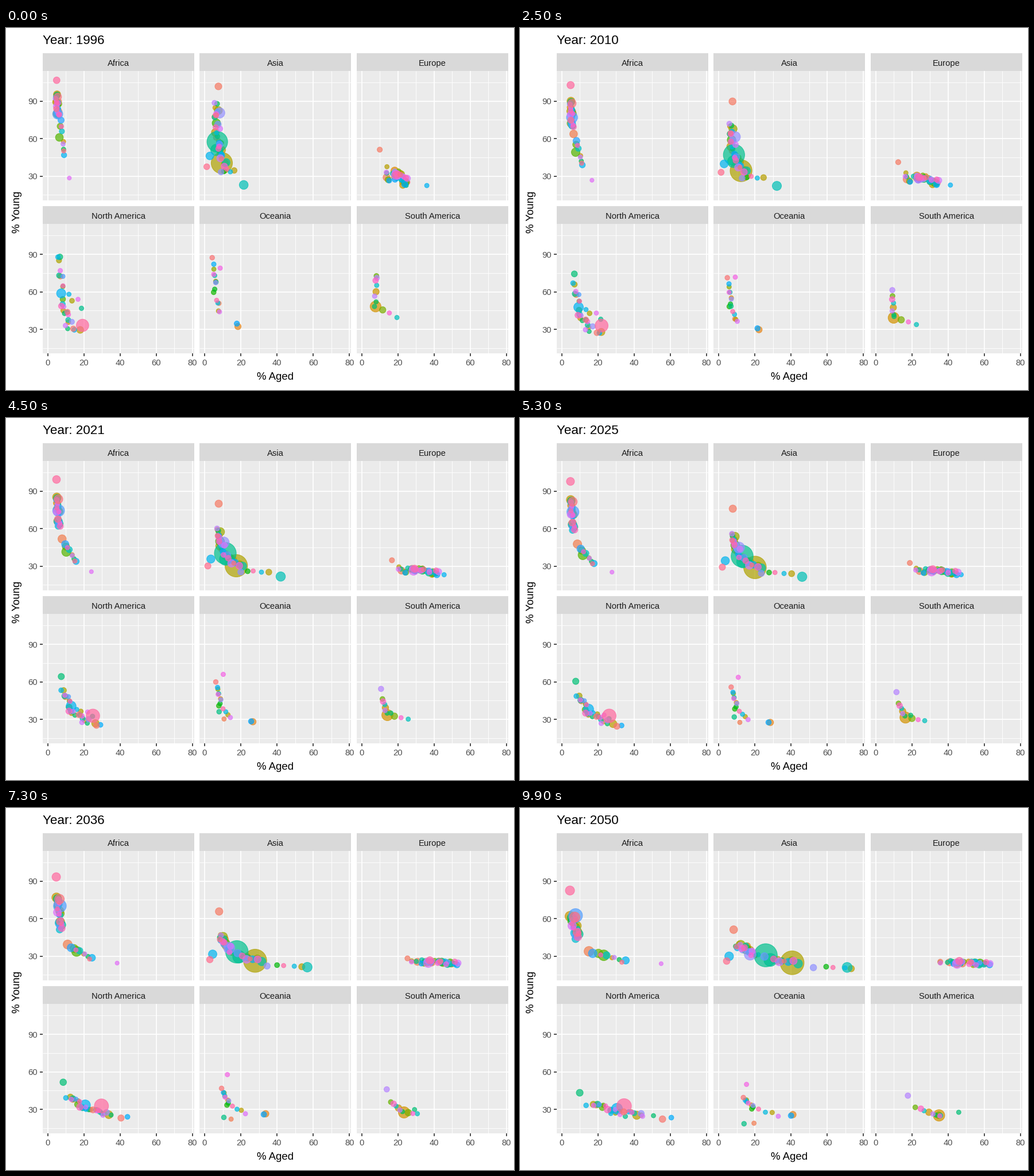
Animation of 885 by 632 pixels, one loop 10 s. Source, as a matplotlib script:

```python
import numpy as np
import matplotlib.pyplot as plt
from matplotlib.animation import FuncAnimation
from matplotlib.patches import Rectangle

W, H, DPI = 885, 632, 100
PT = 72 / DPI                       # points per pixel
FRAMES, INTERVAL = 100, 100
FIRST, LAST = 1996, 2050
PANELS = ["Africa", "Asia", "Europe", "North America", "Oceania", "South America"]
AFRICA, ASIA, EUROPE, NORTH, OCEANIA, SOUTH = range(6)
GROWTH = [1.35, 1.12, 1, 1.18, 1.05, 1.05]     # radius gain over the whole span
R_MIN = 4.3
R_MAX = [7.2, 8, 7.5, 5.6, 5.2, 6.5]

plt.rcParams["font.family"] = "Liberation Sans"
rng = np.random.default_rng(11)


def hcl(hue, chroma=100, light=65):
    """Polar LUV to sRGB; hue runs once round the wheel for 0..1."""
    h = np.radians(15 + 360 * hue)
    u = chroma * np.cos(h) / (13 * light) + 0.1978
    v = chroma * np.sin(h) / (13 * light) + 0.4683
    y = ((light + 16) / 116) ** 3
    x = y * 9 * u / (4 * v)
    z = y * (12 - 3 * u - 20 * v) / (4 * v)
    m = np.array([[3.2405, -1.5371, -0.4985],
                  [-0.9693, 1.8760, 0.0416],
                  [0.0556, -0.2040, 1.0572]])
    rgb = np.clip(m @ [x, y, z], 0, 1)
    return np.where(rgb > 0.0031308, 1.055 * rgb ** (1 / 2.4) - 0.055, 12.92 * rgb)


def to_px(panel, x, y):
    row, col = np.divmod(panel, 3)
    return 72.5 + 273.55 * col + 3.153 * x, 127.7 + 267.5 * row + 2.183 * (90 - y)


bubbles = []                        # panel, hue, radius, start x y, end x y


def add(panel, hue, radius, start, end):
    bubbles.append((panel, hue, radius, *start, *end))


def crowd(panel, n, start_a, start_b, end_a, end_b, spread=1.0):
    """Bubbles strung along one segment that drift to another."""
    seg = np.array([start_a, start_b, end_a, end_b], float)
    shift = rng.random()
    for k in range(n):
        u = (k + 0.5) / n
        start = seg[0] + (seg[1] - seg[0]) * u + rng.uniform(-1, 1, 2) * (1, 3) * spread
        end = seg[2] + (seg[3] - seg[2]) * u + rng.uniform(-1, 1, 2) * (1.5, 1.2) * spread
        radius = R_MIN + (R_MAX[panel] - R_MIN) * rng.random() ** 2
        add(panel, (shift + 0.618 * k) % 1, radius, start, end)


# Bubbles that stand out: hue, radius, where they start and where they end.
add(AFRICA, .94, 6.3, (5, 106.7), (4.6, 82.5))
add(AFRICA, .66, 9.3, (5.6, 79.7), (7.7, 62.5))
add(AFRICA, .285, 7.3, (6.5, 61), (23.3, 30.7))
add(AFRICA, .79, 4, (12, 28.5), (55, 24))
add(ASIA, .18, 19, (9.5, 40.5), (40.6, 24.7))
add(ASIA, .42, 18.5, (7, 57.5), (26, 30.7))
add(ASIA, .43, 10.5, (6.5, 51), (28.6, 27))
add(ASIA, .475, 8.2, (21.6, 23), (71, 21))
add(ASIA, .70, 9.5, (8.3, 80.6), (17.4, 31.5))
add(ASIA, .01, 6.5, (7.6, 101.8), (8.3, 51.2))
add(EUROPE, .01, 5, (10, 51.2), (35.7, 25.6))
add(EUROPE, .78, 8.7, (19, 31), (45, 24))
add(EUROPE, .59, 4.4, (36, 22.5), (57, 23.5))
add(NORTH, .94, 11.3, (19.3, 33.2), (34.5, 32.7))
add(NORTH, .59, 8.5, (7.5, 58.8), (30.6, 30.5))
add(NORTH, .16, 6.5, (18, 29.6), (41.5, 25.3))
add(NORTH, .39, 5.5, (6.8, 88), (10, 43.3))
add(OCEANIA, .64, 5.1, (17.8, 34.6), (40, 25))
add(OCEANIA, .06, 6, (18.4, 32.3), (41, 25.8))
add(OCEANIA, .83, 4.4, (8.6, 79), (15.4, 50))
add(SOUTH, .11, 10, (7.7, 48.3), (35, 25.2))
add(SOUTH, .73, 5.1, (8.4, 71.2), (17.8, 41))
add(SOUTH, .39, 4.4, (7.1, 48.3), (45.9, 27.7))

crowd(AFRICA, 34, (5.2, 95), (5.8, 79), (6, 63), (9, 44))
crowd(AFRICA, 10, (6.5, 82), (9.3, 42), (13, 34), (38, 25))
crowd(ASIA, 22, (6, 88), (8, 52), (10, 40), (21, 31), 1.4)
crowd(ASIA, 13, (7.5, 58), (11, 38), (24, 29), (45, 25), 1.3)
crowd(ASIA, 5, (8, 32), (17, 34), (50, 21.5), (77, 19))
crowd(ASIA, 2, (0.6, 33), (3.6, 51), (4, 24), (6.4, 32), 0.3)
crowd(EUROPE, 32, (17, 34), (25, 25), (42, 25), (64, 23.5), 1.2)
crowd(EUROPE, 6, (14, 38), (15, 25), (33, 26), (48, 24.5))
crowd(NORTH, 8, (5.5, 87), (9, 62), (14, 34), (25, 33))
crowd(NORTH, 13, (7.5, 52), (13, 35), (22, 31), (46, 25.5))
crowd(NORTH, 4, (11, 59), (20, 48), (26, 28), (38, 25))
crowd(NORTH, 4, (9.5, 32), (16, 29), (43, 25.5), (63, 22))
crowd(OCEANIA, 8, (4.6, 88), (6.5, 62), (13, 40), (20, 31))
crowd(OCEANIA, 5, (5.5, 61), (8.4, 42), (18, 31), (33, 25))
crowd(OCEANIA, 2, (5, 75), (9, 44), (11.5, 19), (22, 19), 0.4)
crowd(SOUTH, 6, (8.2, 76), (7.3, 48), (21, 31.5), (34, 25.5), 0.6)
crowd(SOUTH, 3, (9, 46), (22, 38), (34.5, 25), (37, 25), 0.5)

bubbles.sort(key=lambda b: b[1])
panel, hue, radius, x0, y0, x1, y1 = np.array(bubbles, float).T
growth = np.array(GROWTH)[panel.astype(int)]
# Old populations age steadily, young ones late; high birth rates fall late.
age_power = np.maximum(1, 2.2 - 0.05 * x0)
youth_power = np.clip(1.7 - 0.04 * (y1 - 32), 0.6, 1.7)


def positions(t):
    x = x0 + (x1 - x0) * t ** age_power
    y = y1 + (y0 - y1) * (1 - t) ** youth_power
    return np.column_stack(to_px(panel, x, y))


def sizes(t):
    r = radius * (1 + (growth - 1) * t * (radius > 5))
    return (2 * (r - 0.5) * PT) ** 2


fig = plt.figure(figsize=(W / DPI, H / DPI), dpi=DPI, facecolor="white")
ax = fig.add_axes([0, 0, 1, 1])
ax.set(xlim=(0, W), ylim=(H, 0))
ax.axis("off")


def box(x, y, w, h, color):
    ax.add_patch(Rectangle((x, y), w, h, fc=color, lw=0, zorder=0))


def line(xs, ys, width, color="white"):
    ax.plot(xs, ys, color=color, lw=width * PT, solid_capstyle="butt", zorder=1)


def label(x, y, s, px, color="black", **kw):
    return ax.text(x, y, s, fontsize=px * PT, color=color, **kw)


for p, name in enumerate(PANELS):
    row, col = divmod(p, 3)
    left, top = int(64 + 273.5 * col), int(75 + 267.5 * row)
    right, bottom = left + 264, top + 226
    box(left, top - 31, 264, 31, "#D9D9D9")
    box(left, top, 264, 226, "#EBEBEB")
    label(left + 132, top - 9.3, name, 14.8, "#1A1A1A", ha="center")
    for width, gx0, gy0 in ((0.9, 10, 15), (1.7, 0, 30)):
        for gx in range(gx0, 81, 20):
            x = to_px(p, gx, 0)[0]
            line([x, x], [top, bottom], width)
        for gy in range(gy0, 106, 30):
            y = to_px(p, 0, gy)[1]
            line([left, right], [y, y], width)
    if row == 1:
        for gx in range(0, 81, 20):
            x = to_px(p, gx, 0)[0]
            line([x, x], [bottom, bottom + 4.6], 1.7, "#333333")
            label(x, 589, str(gx), 14.8, "#4D4D4D", ha="center")
    if col == 0:
        for gy in (30, 60, 90):
            y = to_px(p, 0, gy)[1]
            line([left - 4.6, left], [y, y], 1.7, "#333333")
            label(left - 9, y + 5.6, str(gy), 14.8, "#4D4D4D", ha="right")

label(469.5, 614, "% Aged", 18.7, ha="center")
label(24, 321.5, "% Young", 18.7, rotation=90, rotation_mode="anchor", ha="center")
title = label(64, 27.5, "", 22.4)

colors = [(*hcl(h), 0.7) for h in hue]
dots = ax.scatter(*positions(0).T, s=sizes(0), c=colors,
                  edgecolors=colors, linewidths=1.1 * PT, zorder=3)


def update(i):
    t = i / (FRAMES - 1)
    dots.set_offsets(positions(t))
    dots.set_sizes(sizes(t))
    title.set_text(f"Year: {round(FIRST + (LAST - FIRST) * t)}")
    return dots, title


anim = FuncAnimation(fig, update, frames=FRAMES, interval=INTERVAL,
                     repeat=True, repeat_delay=0)
plt.show()
```
